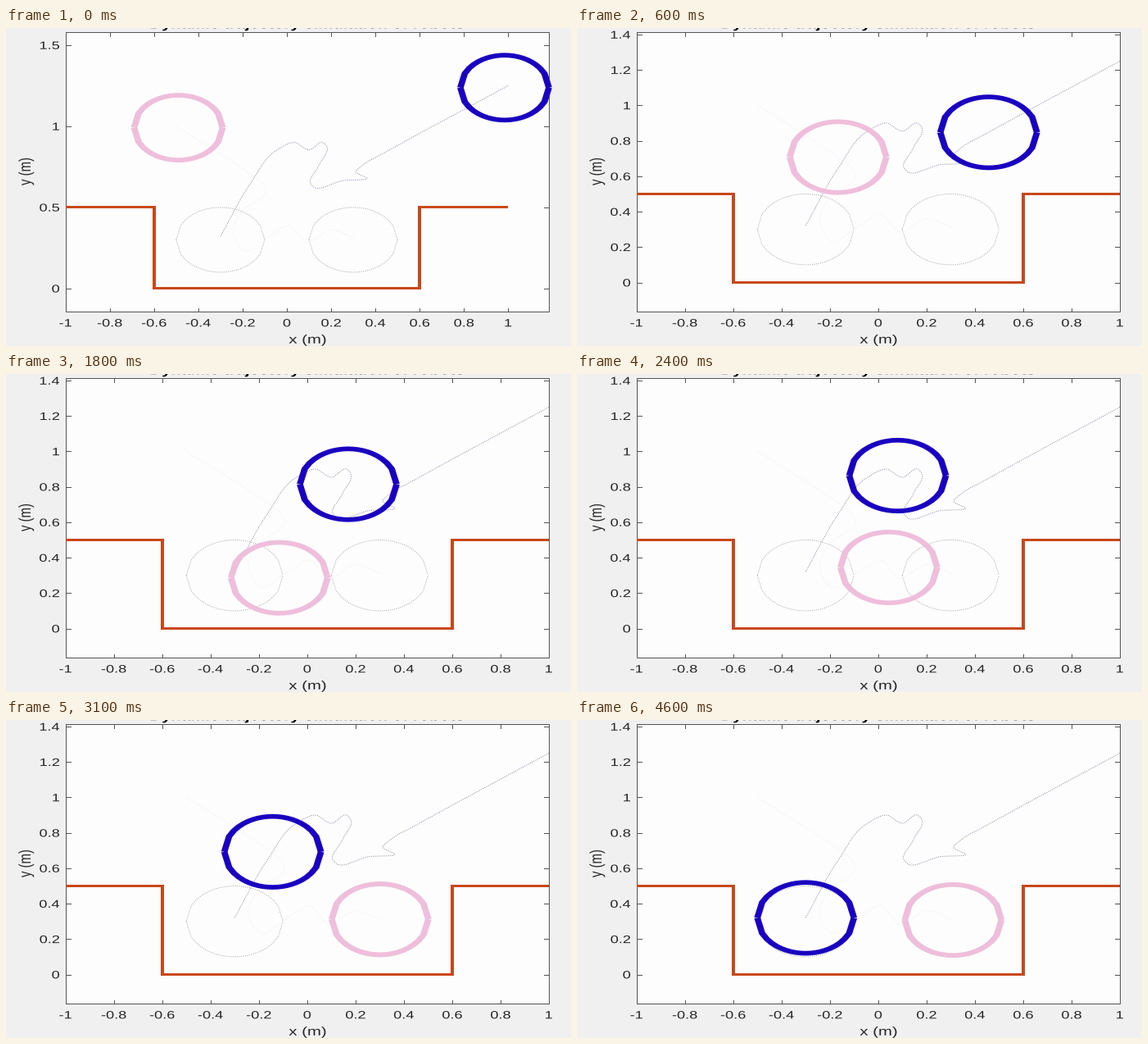
These frames come from a looping animation (690 px wide and 388 px high, 4.7 s). A matplotlib script:

```python
import numpy as np
import matplotlib.pyplot as plt
from matplotlib.animation import FuncAnimation
from matplotlib.patches import PathPatch, Polygon, Rectangle
from matplotlib.textpath import TextPath
from matplotlib.transforms import Affine2D

W, H, DPI = 690, 388, 100
FRAMES, STEP = 47, 100
PT = 72 / DPI
ASPECT = 1.366                      # the square-unit plot is shown this much wider
LEFT, RIGHT, TOP, BOTTOM = 72.6, 663, 5, 346
R = 0.2

BLUE, PINK, ORANGE = "#1a00c0", "#efbedb", "#c8481a"
INK, FRAME = "#262626", "#555555"


def hermite(t, keys, vals):
    """Smooth interpolation through keyed values."""
    slope = np.gradient(vals, keys)
    i = np.clip(np.searchsorted(keys, t, side="right") - 1, 0, len(keys) - 2)
    h = keys[i + 1] - keys[i]
    u = (t - keys[i]) / h
    return ((1 + 2 * u) * (1 - u) ** 2 * vals[i] + u * (1 - u) ** 2 * h * slope[i]
            + u * u * (3 - 2 * u) * vals[i + 1] + u * u * (u - 1) * h * slope[i + 1])


class Track:
    """A smooth path through waypoints; stops tell the waypoint reached every 600 ms."""

    def __init__(self, points, stops):
        self.xy = np.array(points, float).T
        self.d = np.r_[0, np.cumsum(np.hypot(*np.diff(self.xy)))]
        self.times = np.minimum(600 * np.arange(len(stops)), (FRAMES - 1) * STEP)
        self.reached = np.interp(stops, np.arange(len(points)), self.d)
        self.path = self.at(np.linspace(0, self.d[-1], 500))

    def at(self, d):
        return np.stack([hermite(d, self.d, v) for v in self.xy], axis=-1)

    def pos(self, t):
        return self.at(np.clip(hermite(t, self.times, self.reached), 0, self.d[-1]))


blue = Track([(1, 1.25), (.457, .848), (.34, .757), (.312, .72), (.362, .68),
              (.257, .666), (.12, .627), (.108, .645), (.142, .752), (.176, .885),
              (.163, .9), (.1, .854), (.034, .9), (-.044, .854), (-.163, .65),
              (-.3, .32)],
             [.03, 1, 5, 8.45, 11.3, 13.6, 14.5, 14.88, 15])
pink = Track([(-.5, 1), (-.166, .708), (-.11, .65), (-.095, .6), (-.2, .48),
              (-.242, .343), (-.19, .23), (-.08, .32), (.015, .385), (.044, .345),
              (.085, .285), (.2, .36), (.31, .308)],
             [.03, 1, 5, 6.7, 9, 11.75, 12, 12, 12])

GROUND = np.array([(-1, .5), (-.6, .5), (-.6, 0), (.6, 0), (.6, .5), (1, .5)])
arc_x = np.linspace(-R, R, 21)
arc_y = np.sqrt(np.maximum(R * R - arc_x ** 2, 0))
HALVES = [np.c_[arc_x, arc_y], np.c_[arc_x, -arc_y]]

fig = plt.figure(figsize=(W / DPI, H / DPI), dpi=DPI, facecolor="#f0f0f0")
ax = fig.add_axes([0, 0, 1, 1])


def label(s, x, y, size=13.3, ha="center", angle=0, color=INK, weight="normal"):
    """Text on its baseline, in the plot's aspect."""
    path = TextPath((0, 0), s, size=size,
                    prop={"family": "Liberation Sans", "weight": weight})
    box = path.get_extents()
    dx = -box.x1 if ha == "right" else -(box.x0 + box.x1) / 2
    tr = Affine2D().translate(dx, 0).rotate_deg(angle).scale(ASPECT, -1).translate(x, y)
    ax.add_patch(PathPatch(tr.transform_path(path), fc=color, lw=0, zorder=6))


def ribbon(p, width, color, z):
    """Mitred stroke whose width follows the plot's aspect."""
    stretch = np.array([ASPECT, 1])
    q = p / stretch
    d = np.diff(q, axis=0)
    n = np.c_[-d[:, 1], d[:, 0]] / np.hypot(*d.T)[:, None]
    a, b = np.vstack([n[:1], n]), np.vstack([n, n[-1:]])
    off = (a + b) / (1 + (a * b).sum(1))[:, None] * width / 2
    ax.add_patch(Polygon(np.vstack([q + off, (q - off)[::-1]]) * stretch,
                         fc=color, lw=0, zorder=z))


def line(x, y, color=FRAME, width=1.0, z=3, **kw):
    ax.plot(x, y, color=color, lw=width * PT, zorder=z, **kw)


def dotted(p, color, width=0.9):
    line(p[:, 0], p[:, 1], color, width, 2, ls=(0, (1.2, 1.6)), dash_capstyle="butt")


def draw(i):
    t = i * STEP
    cb, cp = blue.pos(t), pink.pos(t)

    # Equal axes fitted tightly around all the data
    xmax = max(1, cb[0] + R)
    mid = max(1.25, cb[1] + R) / 2
    sx = (RIGHT - LEFT) / (xmax + 1)
    sy = sx / ASPECT
    cy = (TOP + BOTTOM) / 2

    def to_px(p):
        return np.c_[LEFT + (p[:, 0] + 1) * sx, cy - (p[:, 1] - mid) * sy]

    ax.clear()
    ax.set(xlim=(0, W), ylim=(H, 0))
    ax.axis("off")
    ax.add_patch(Rectangle((LEFT, TOP), RIGHT - LEFT, BOTTOM - TOP, fc="#fdfdfd", lw=0))

    for x0 in (-.3, .3):
        for half in HALVES:
            dotted(to_px(half + (x0, .3)), "#a4a4a4")
    dotted(to_px(pink.path), "#eeeeee", 0.8)
    dotted(to_px(blue.path), "#8484a2")

    line([LEFT, RIGHT, RIGHT, LEFT, LEFT], [TOP, TOP, BOTTOM, BOTTOM, TOP])
    for k in range(-5, 6):
        x = LEFT + (k / 5 + 1) * sx
        line([x, x], [BOTTOM, BOTTOM - 4.5])
        line([x, x], [TOP, TOP + 4.5])
        label(f"{k / 5:g}", x, 364.3)
    top = mid + (cy - TOP) / sy
    gap = 0.5 if top >= 1.5 else 0.2
    for k in range(int(top / gap + 1e-6) + 1):
        y = cy - (k * gap - mid) * sy
        line([LEFT, LEFT + 6], [y, y])
        line([RIGHT, RIGHT - 6], [y, y])
        label(f"{k * gap:g}", 65, y + 4.8, ha="right")

    label("x (m)", 368, 384.8, 14.9)
    label("y (m)", 30, cy, 14.9, angle=90)
    label("Dynamic trajectory simulation of robots", 368, 0.2, 14.9,
          color="black", weight="bold")

    ribbon(to_px(GROUND), 2.9, ORANGE, 4)
    for c, color in ((cp, PINK), (cb, BLUE)):
        for half in HALVES:
            ribbon(to_px(half + c), 5.7, color, 5)
    return []


anim = FuncAnimation(fig, draw, frames=FRAMES, interval=STEP, repeat=True,
                     repeat_delay=0, init_func=lambda: [], blit=False)
plt.show()
```
